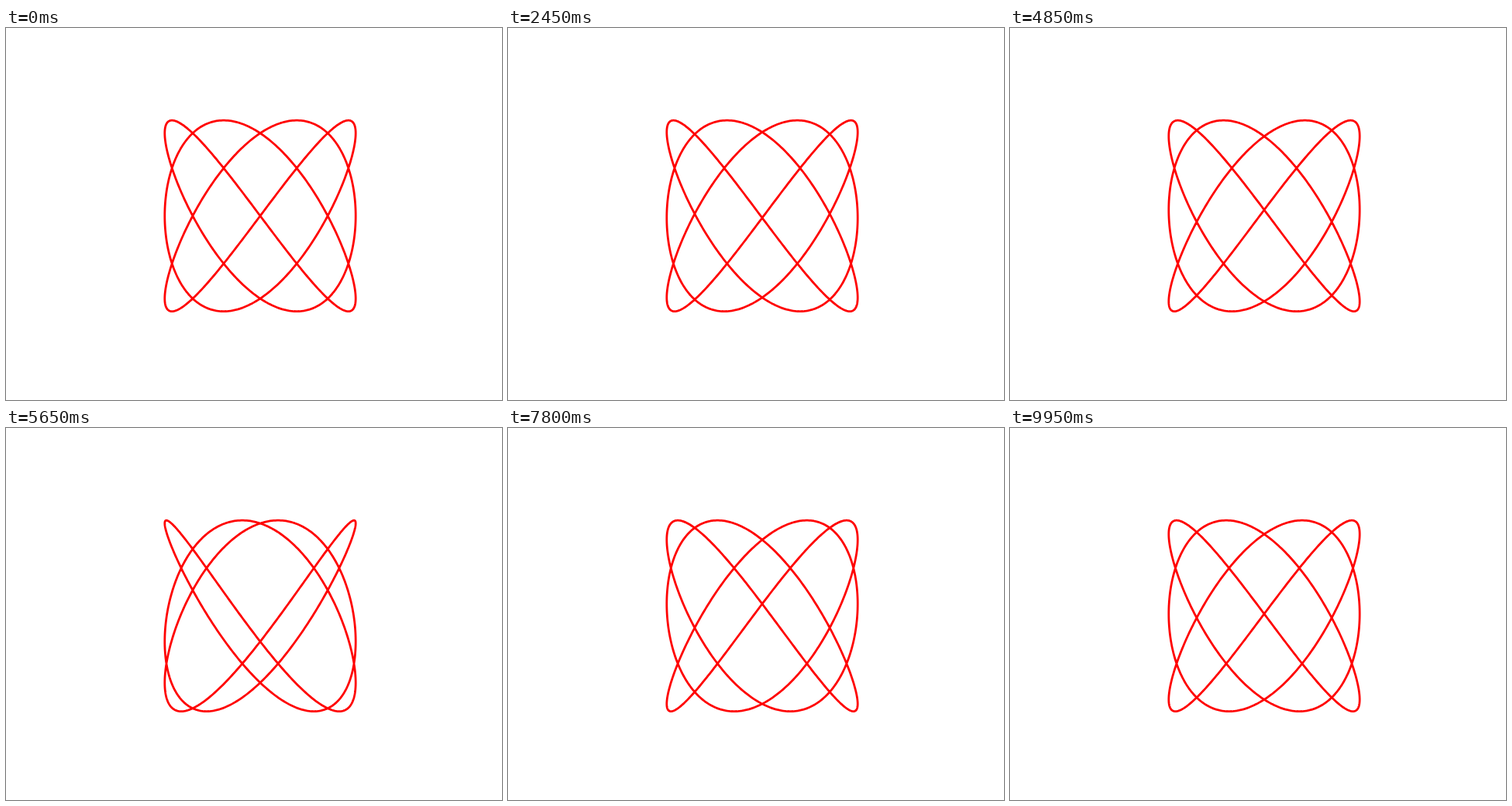
Recreate the animation shown at these times as an HTML page with a canvas. Size 640 by 480 pixels, loop 10000 ms.

```html
<!DOCTYPE html>
<html lang="en">
<head>
<meta charset="utf-8">
<title>Lissajous curve</title>
<style>
  html, body { margin: 0; width: 100%; height: 100%; overflow: hidden; background: #fff; }
  canvas { display: block; }
</style>
</head>
<body>
<canvas width="640" height="480"></canvas>
<script>
  const ctx = document.querySelector('canvas').getContext('2d');
  const LOOP = 10000, STEP = 50, POINTS = 1000;
  const CX = 328, CY = 242.4, R = 123.2;

  ctx.strokeStyle = '#f00';
  ctx.lineWidth = 2 * 100 / 72;
  ctx.lineJoin = 'round';

  // x = sin(3t + phase), y = sin(4t)
  function draw(phase) {
    ctx.clearRect(0, 0, 640, 480);
    ctx.beginPath();
    for (let i = 0; i < POINTS; i++) {
      const t = 2 * Math.PI * i / POINTS;
      ctx.lineTo(CX + R * Math.sin(3 * t + phase), CY - R * Math.sin(4 * t));
    }
    ctx.closePath();
    ctx.stroke();
  }

  const start = performance.now();

  // The phase advances by half a turn per loop, in steps of 50 ms.
  function tick() {
    const time = (performance.now() - start) % LOOP;
    draw(Math.PI * Math.floor(time / STEP) * STEP / LOOP);
    requestAnimationFrame(tick);
  }
  tick();
</script>
</body>
</html>
```
